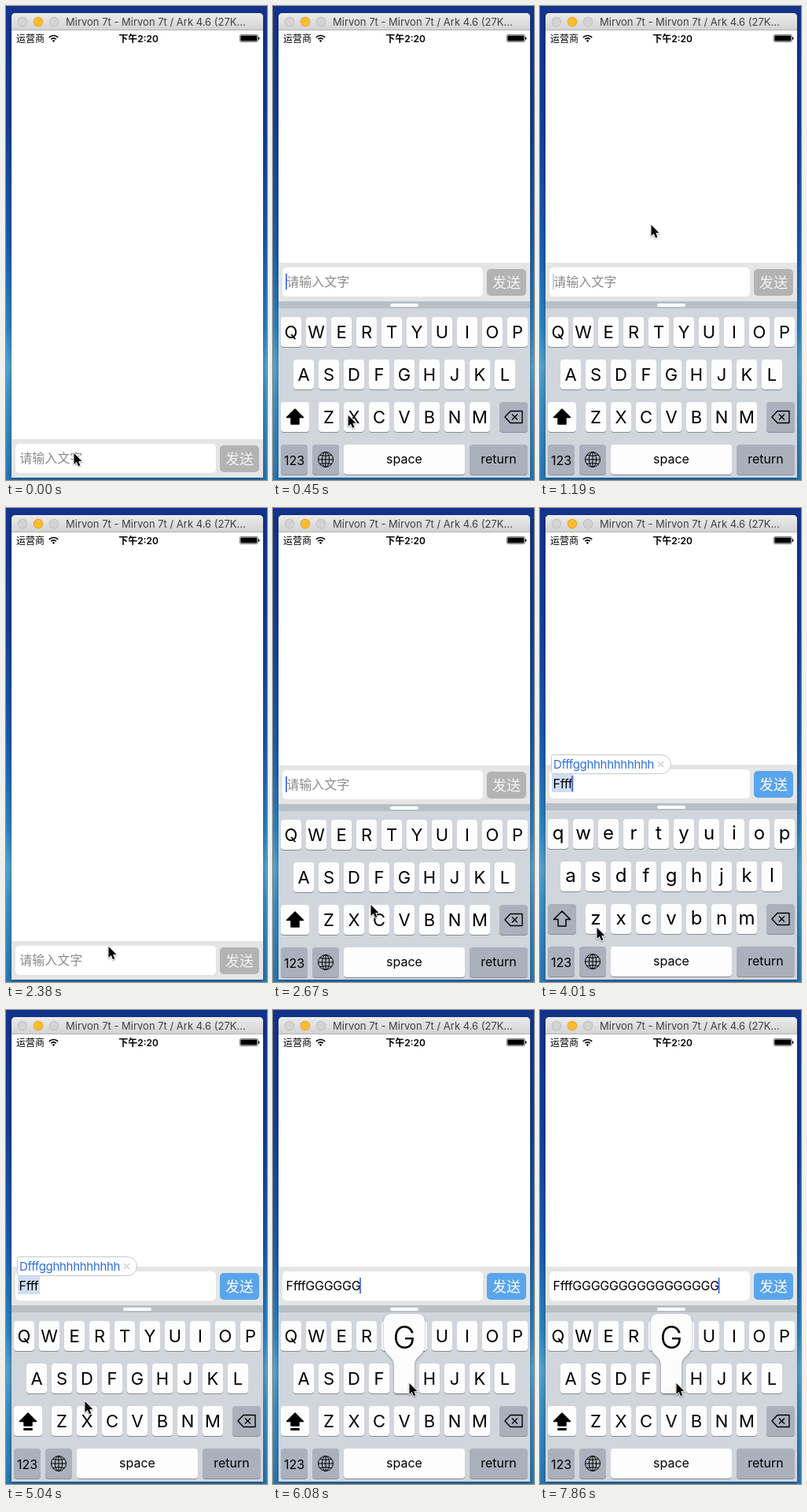
Write an HTML page with a canvas that moves like this. It is 332 by 602 pixels and loops after 8 s.

```html
<!DOCTYPE html>
<html lang="zh-CN">
<head>
<meta charset="utf-8">
<title>Keyboard demo</title>
<style>
html, body { margin: 0; width: 100%; height: 100%; overflow: hidden; background: #123f97; }
canvas { display: block; width: 332px; height: 602px; }
</style>
</head>
<body>
<canvas id="stage"></canvas>
<script>
const W = 332, H = 602, LOOP = 8000, STEP = 148.3;
const FONT = 'Inter, "Noto Sans CJK SC", "Noto Sans CJK", sans-serif';
const canvas = document.getElementById('stage');
const ratio = window.devicePixelRatio || 1;
canvas.width = W * ratio;
canvas.height = H * ratio;
const c = canvas.getContext('2d');

// pointer path: step, x, y
const PATH = [
  [0, 86, 568], [2, 86, 568], [8, 141, 278], [10, 141, 278], [14, 131, 545],
  [15, 131, 545], [16, 130, 557], [17, 130, 557], [18, 124, 504], [21, 136, 470],
  [25, 136, 470], [26, 130, 478], [27, 72, 533], [28, 54, 538], [30, 27, 520],
  [32, 27, 520], [36, 173, 474]
];

function rr(x, y, w, h, r, fill) {
  c.beginPath();
  c.roundRect(x, y, w, h, r);
  c.fillStyle = fill;
  c.fill();
}

function rect(x, y, w, h, fill) {
  c.fillStyle = fill;
  c.fillRect(x, y, w, h);
}

function disc(x, y, r, fill) {
  c.beginPath();
  c.arc(x, y, r, 0, Math.PI * 2);
  c.fillStyle = fill;
  c.fill();
}

function poly(points) {
  c.beginPath();
  points.forEach(([x, y]) => c.lineTo(x, y));
  c.closePath();
}

function text(str, x, y, size, fill, opt = {}) {
  c.font = `${opt.weight || 400} ${size}px ${FONT}`;
  c.letterSpacing = (opt.track || 0) + 'px';
  c.textAlign = opt.align || 'left';
  c.fillStyle = fill;
  c.fillText(str, x, y);
  return c.measureText(str).width;
}

const mid = { align: 'center' };

function gradient(y0, y1, stops) {
  const g = c.createLinearGradient(0, y0, 0, y1);
  stops.forEach(([p, col]) => g.addColorStop(p, col));
  return g;
}

const ease = p => 1 - Math.pow(1 - Math.min(1, Math.max(0, p)), 4);

function keyboardRise(k) {
  const move = start => ease((k - start) / 2.2);
  if (k < 9.6) return move(0.6);
  if (k < 16) return 1 - move(9.6);
  return move(16.4);
}

function pointerAt(k) {
  let i = 0;
  while (i < PATH.length - 1 && PATH[i + 1][0] <= k) i++;
  const a = PATH[i], b = PATH[i + 1] || a;
  const p = b === a ? 0 : (k - a[0]) / (b[0] - a[0]);
  return [a[1] + (b[1] - a[1]) * p, a[2] + (b[2] - a[2]) * p];
}

function typedAt(k) {
  if (k < 24) return '';
  if (k < 26) return k < 25 ? 'F' : 'Fff';
  const n = Math.max(0, k - 35) - (k >= 44) - (k >= 52);
  return 'Ffff' + 'G'.repeat(n);
}

function popupAt(k) {
  if (k === 24) return ['F', 135];
  if (k === 25) return ['f', 135];
  return k >= 36 && k !== 39 ? ['G', 167] : null;
}

function caretAlpha(k) {
  if (k < 2 || (k > 9 && k < 17)) return 0;
  if (k === 8 || k === 9) return 0.35;
  return [6, 7, 21, 30, 31, 34].includes(k) ? 0 : 1;
}

function drawDesktop() {
  rect(0, 0, W, H, gradient(0, H, [
    [0, '#14348c'], [0.25, '#123f97'], [0.5, '#1a5dac'], [0.68, '#2c86c4'],
    [0.76, '#55a6d1'], [0.83, '#3c92c5'], [1, '#2a78b2']
  ]));
}

function drawTitleBar() {
  c.save();
  c.shadowColor = 'rgba(0,0,20,.4)';
  c.shadowBlur = 6;
  c.shadowOffsetY = 2;
  rr(7, 9, 320, 590, [5, 5, 0, 0], '#fff');
  c.restore();
  rr(7, 9, 320, 22, [5, 5, 0, 0], gradient(9, 31, [[0, '#ececec'], [1, '#d2d2d2']]));
  rect(7, 30, 320, 1, '#b4b4b4');
  [[21, '#bcbcbc', '#d3d3d3'], [41, '#dfa023', '#fdbc2f'], [61, '#bcbcbc', '#d3d3d3']]
    .forEach(([x, edge, fill]) => {
      disc(x, 20, 6.2, edge);
      disc(x, 20, 5.4, fill);
    });
  text('Mirvon 7t - Mirvon 7t / Ark 4.6 (27K...', 76, 25, 13, '#404040');
}

function drawStatusBar() {
  text('运营商', 13, 45.5, 12, '#000');
  c.strokeStyle = '#000';
  c.lineWidth = 1.7;
  [4.6, 8].forEach(r => {
    c.beginPath();
    c.arc(60.5, 45.5, r, -Math.PI * 0.75, -Math.PI * 0.25);
    c.stroke();
  });
  poly([[60.5, 46], [58.7, 43.9], [60.5, 43.1], [62.3, 43.9]]);
  c.fillStyle = '#000';
  c.fill();
  text('下午2:20', 168.5, 45.5, 12, '#000', { align: 'center', weight: 600 });
  c.lineWidth = 0.8;
  c.strokeStyle = '#555';
  c.beginPath();
  c.roundRect(297.4, 36.4, 23, 9.2, 1.8);
  c.stroke();
  rr(298.4, 37.4, 21, 7.2, 1, '#000');
  rr(321, 39.5, 1.4, 3.2, 0.6, '#000');
}

function drawInput(k, y) {
  const str = typedAt(k);
  const suggest = k >= 26 && k < 36;
  rect(7, y, 320, 49, '#e5e5e5');
  rr(12, y + 6, 255, 37, 5, '#fff');
  rr(272, y + 8, 50, 34, 5, str ? '#59a5ec' : '#b3b3b3');
  text('发送', 297, y + 31.5, 18, str ? '#fff' : '#f4f4f4', mid);

  if (suggest) rect(15, y + 12, 28, 23, '#cfdef5');
  let end = 16;
  if (str) end = 16.5 + text(str, 16.5, y + 29.5, 16, '#000', { track: -0.28 });
  else text('请输入文字', 17.3, y + 30, 16, '#8b8b8b');
  c.globalAlpha = caretAlpha(k);
  rect(str ? end - 1.2 : end, y + 14, 1.8, 20, '#4269f0');
  c.globalAlpha = 1;

  if (suggest) {
    rr(14.5, y - 12.5, 152, 24, [2, 12, 12, 2], '#fff');
    c.strokeStyle = '#c6c8cb';
    c.lineWidth = 1;
    c.stroke();
    text('Dfffgghhhhhhhhhh', 17, y + 5, 15, '#2c6ee0', { track: -0.3 });
    c.strokeStyle = '#b0b0b0';
    c.beginPath();
    c.moveTo(150, y - 4); c.lineTo(157, y + 3);
    c.moveTo(157, y - 4); c.lineTo(150, y + 3);
    c.stroke();
  }
}

function key(x, y, w, dark) {
  rr(x, y + 1, w, 38, 4, '#898c92');
  rr(x, y, w, 38, 4, dark ? '#abb0bd' : '#fdfdfd');
}

function drawShift(y, caps, lock) {
  key(10, y, 36, !caps);
  const b = lock ? y + 25 : y + 28;
  poly([[28, y + 9], [38.5, y + 19.5], [33, y + 19.5], [33, b],
    [23, b], [23, y + 19.5], [17.5, y + 19.5]]);
  c.lineJoin = 'round';
  c.lineWidth = 1.5;
  c.strokeStyle = c.fillStyle = '#000';
  if (caps) c.fill();
  c.stroke();
  if (lock) rect(22.3, y + 28, 11.4, 3, '#000');
}

function drawDelete(y) {
  key(288, y, 36, true);
  c.strokeStyle = '#000';
  c.lineWidth = 1.4;
  c.lineJoin = 'round';
  poly([[295, y + 19], [302, y + 11.5], [317, y + 11.5], [317, y + 26.5], [302, y + 26.5]]);
  c.stroke();
  c.beginPath();
  c.moveTo(304, y + 15.5); c.lineTo(311, y + 22.5);
  c.moveTo(311, y + 15.5); c.lineTo(304, y + 22.5);
  c.stroke();
}

function drawGlobe(x, y) {
  c.strokeStyle = '#000';
  c.lineWidth = 1;
  c.beginPath();
  c.arc(x, y, 9.5, 0, Math.PI * 2);
  c.moveTo(x + 4.6, y);
  c.ellipse(x, y, 4.6, 9.5, 0, 0, Math.PI * 2);
  c.moveTo(x, y - 9.5); c.lineTo(x, y + 9.5);
  c.moveTo(x - 9.5, y); c.lineTo(x + 9.5, y);
  [-1, 1].forEach(s => {
    c.moveTo(x - 7.6, y + s * 5.6);
    c.quadraticCurveTo(x, y + s * 3.6, x + 7.6, y + s * 5.6);
  });
  c.stroke();
}

function drawPopup(letter, x, y) {
  const top = y + 11, base = y + 112;
  c.save();
  c.shadowColor = 'rgba(0,0,0,.35)';
  c.shadowBlur = 3;
  c.shadowOffsetY = 1;
  c.beginPath();
  c.moveTo(x - 26, top + 9);
  c.quadraticCurveTo(x - 26, top, x - 16, top);
  c.lineTo(x + 16, top);
  c.quadraticCurveTo(x + 26, top, x + 26, top + 9);
  c.lineTo(x + 26, top + 39);
  c.bezierCurveTo(x + 26, top + 54, x + 13, top + 52, x + 13, top + 66);
  c.lineTo(x + 13, base - 4);
  c.quadraticCurveTo(x + 13, base, x + 9, base);
  c.lineTo(x - 9, base);
  c.quadraticCurveTo(x - 13, base, x - 13, base - 4);
  c.lineTo(x - 13, top + 66);
  c.bezierCurveTo(x - 13, top + 52, x - 26, top + 54, x - 26, top + 39);
  c.closePath();
  c.fillStyle = '#fcfcfc';
  c.fill();
  c.restore();
  text(letter, x, y + 54.5, 39, '#000', { align: 'center', weight: 300 });
}

function drawKeyboard(k, y) {
  const caps = k < 25 || k >= 30;
  rect(7, y, 320, 224, '#d1d5dc');
  rect(7, y, 320, 9, '#b8c0c6');
  rr(149, y + 3, 36, 4, 2, '#fff');
  [['QWERTYUIOP', 10], ['ASDFGHJKL', 26], ['ZXCVBNM', 58]].forEach(([row, x0], r) => {
    const ky = y + 20 + r * 54;
    [...row].forEach((ch, i) => {
      const x = x0 + i * 32;
      key(x, ky, 26);
      if (caps) text(ch, x + 13, ky + 27, 22, '#000', mid);
      else text(ch.toLowerCase(), x + 13, ky + 26, 24, '#000', mid);
    });
  });
  drawShift(y + 128, caps, k >= 32);
  drawDelete(y + 128);
  const by = y + 182;
  key(10, by, 34, true);
  key(50, by, 34, true);
  key(90, by, 154);
  key(250, by, 74, true);
  text('123', 27, by + 25.5, 16, '#000', mid);
  drawGlobe(67, by + 19);
  text('space', 167, by + 24, 16, '#000', mid);
  text('return', 287, by + 24, 16, '#000', mid);
  const pop = popupAt(k);
  if (pop) drawPopup(pop[0], pop[1], y);
}

function drawPointer(x, y) {
  c.save();
  c.translate(x, y);
  poly([[0.5, 0], [0.5, 14], [3.7, 11], [6, 16.2], [8.4, 15.2], [6.1, 10.2], [10.4, 10]]);
  c.shadowColor = 'rgba(0,0,0,.35)';
  c.shadowBlur = 2;
  c.shadowOffsetY = 1;
  c.lineJoin = 'round';
  c.lineWidth = 1.8;
  c.strokeStyle = '#fff';
  c.stroke();
  c.shadowColor = 'transparent';
  c.fillStyle = '#000';
  c.fill();
  c.restore();
}

function draw(now) {
  const k = Math.floor(((now % LOOP) + 2) / STEP);
  const lift = Math.round(224 * keyboardRise(k));
  c.setTransform(ratio, 0, 0, ratio, 0, 0);
  drawDesktop();
  drawTitleBar();
  drawStatusBar();
  c.save();
  c.beginPath();
  c.rect(7, 31, 320, 568);
  c.clip();
  if (lift > 0) drawKeyboard(k, 599 - lift);
  drawInput(k, 550 - lift);
  c.restore();
  drawPointer(...pointerAt(k));
}

const start = performance.now();
function tick() {
  draw(performance.now() - start);
  requestAnimationFrame(tick);
}
tick();
</script>
</body>
</html>
```
